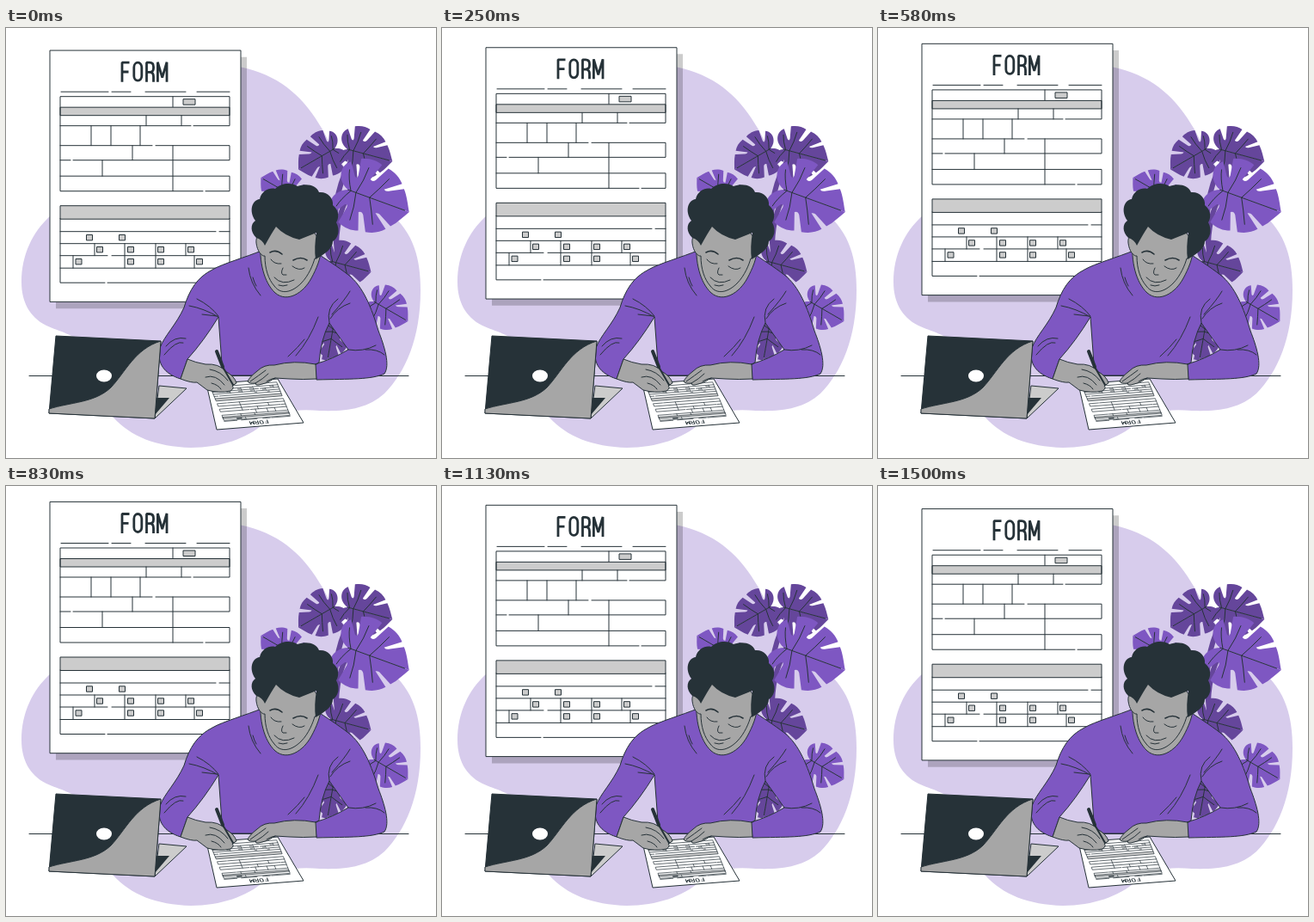
Animation, 500 px wide and 500 px high, one loop 1.54 s. Source, as an HTML page:

```html
<!DOCTYPE html>
<html lang="en">
<head>
<meta charset="utf-8">
<title>Filling in a form</title>
<style>
  html, body { margin: 0; width: 100%; height: 100%; overflow: hidden; background: #fff; }
  svg { display: block; width: 100vw; height: 100vh; }
  .line { fill: none; stroke: #263238; stroke-linecap: round; stroke-linejoin: round; }
  .ink { stroke: #263238; stroke-linejoin: round; }
  .thin { vector-effect: non-scaling-stroke; }
  .dark { fill: #65469b; }
  .purple { fill: #7e57c2; }
  .skin { fill: #a6a6a6; }
  .grey { fill: #ccc; }
</style>
</head>
<body>
<svg viewBox="0 0 500 500">
  <defs>
    <g id="half">
      <path d="M0 8C8 30 34 36 46 19L25 5Q21 0 28 0L56 5C62-8 62-20 58-31L29-21Q25-26 31-30L56-43C54-56 48-66 40-73L21-48Q18-53 22-58L33-79C23-88 10-94 0-100Z"/>
      <path class="line thin" d="M0 3Q18 14 32 17M0-6Q24-12 46-12M0-30Q18-40 40-50"/>
    </g>
    <g id="leaf">
      <use href="#half"/>
      <use href="#half" transform="scale(-1 1)"/>
      <path class="line thin" d="M0 8V-92"/>
    </g>
    <marker id="box" markerUnits="userSpaceOnUse" markerWidth="9" markerHeight="9" refX="4.5" refY="4.5">
      <path class="ink grey" stroke-width="1" d="M1 1.3H8V7.7H1Z"/>
    </marker>
    <!-- shared by the poster and the sheet on the table -->
    <g id="content">
      <path role="img" aria-label="FORM" fill="none" stroke="#263238" stroke-width="2.8" stroke-linejoin="bevel"
        d="M135 63V40.5H143.5M135 51.3H142.5M148.8 46a4.5 5.5 0 0 1 9 0V56a4.5 5.5 0 0 1-9 0ZM163.5 63V40.5H167Q171.5 40.5 171.5 45.5V47Q171.5 51.7 167 51.7H163.5M167.5 51.7Q171.5 52 171.5 57V63M176.4 63V40L181.7 58 187 40V63"/>
      <path class="ink grey thin" d="M63 92.5H260V102H63ZM63 207H260V222.5H63ZM206 83H220V89.5H206Z"/>
      <path class="line thin" d="M64 74.5H119M123 74.5H145M162 74.5H209M222 74.5H260
        M229 190H63V80H260V114H218M215 114H63M194 80V92M163 102V114M204 102V114
        M99 114V137M122 114V137M156 114V137M63 137H170M174 137H260V154H78M75 154H63M147 137V154
        M194 137V190M112 154V172.5M63 172.5H260V190H232
        M115 296.5H63V222M118 296.5H260M260 222V279.5H63M63 237H244M248 237H260
        M63 251H260M63 265H118M123 265H260M103 251V265M209 251V265M138 251V279.5M174 251V279.5M78 265V279.5M219 265V279.5"/>
      <path fill="none" marker-start="url(#box)" marker-mid="url(#box)" marker-end="url(#box)"
        d="M97 244H135M109 258h36h35h35M84.5 272H145H180H225"/>
    </g>
  </defs>

  <path fill="#d7ccec" d="M280 47C322 58 347 82 368 118C390 160 410 190 445 214C475 238 482 270 482 305C482 360 465 400 440 425C420 443 395 446 365 445C335 442 315 447 300 460C280 477 250 488 215 488C175 487 145 475 125 453C112 438 105 400 95 372C80 356 62 353 47 346C27 336 18 318 18 295C18 264 31 237 51 219L100 150 200 60C240 45 260 42 280 47Z"/>

  <g id="form">
    <path opacity=".2" d="M58 34H280V326.5H58Z"/>
    <path class="ink" fill="#fff" d="M51 26.4H273V318.7H51Z"/>
    <use href="#content"/>
  </g>

  <path class="line" d="M27 404.5H468"/>

  <!-- plant -->
  <path fill="none" stroke="#65469b" stroke-width="6" d="M398 160Q378 200 384 250T370 386M402 190Q386 210 384 250"/>
  <use href="#leaf" class="dark" transform="translate(379 142) rotate(-120) scale(.45)"/>
  <use href="#leaf" class="dark" transform="translate(401 142) rotate(105) scale(.5)"/>
  <use href="#leaf" class="purple" transform="translate(331 194) rotate(-60) scale(.4)"/>
  <use href="#leaf" class="dark" transform="translate(381 272) rotate(105) scale(.45)"/>
  <use href="#leaf" class="dark" transform="translate(380 351) rotate(190) scale(.35)"/>
  <use href="#leaf" class="purple" transform="translate(431 320) rotate(120) scale(.42)"/>
  <use href="#leaf" class="purple" transform="translate(403 190) rotate(110) scale(.7)"/>

  <!-- man -->
  <path class="ink purple" d="M297 259C280 266 252 274 240 281C222 290 213 305 207 325C198 345 184 358 179 372C175 390 184 402 203 408L211 385Q230 364 247 336L252 404H340L364 389Q366 362 376 343L398 374Q380 385 359 391L361 409C400 408 425 409 440 402C447 392 440 370 433 352C425 325 415 300 398 287C385 277 372 269 362 262Z"/>
  <path class="line" d="M282 279Q284 297 296 311M287 290Q289 297 291 300M213 323Q230 326 247 336M222 315Q238 323 247 335M228 333L245 335M186 370Q196 358 209 361M184 380Q198 363 206 366M328 382Q340 371 347 362M337 381Q353 363 363 336M376 343Q372 325 386 315M377 338Q385 325 400 320M379 333Q395 315 400 306M418 374Q432 373 440 380M398 374Q415 377 430 369"/>
  <path class="ink skin" d="M296 245C294 272 300 296 313 308C327 320 346 308 355 291C361 280 366 268 367 255L330 228Z"/>
  <path class="ink skin" d="M312 228C298 240 290 238 291 250C292 260 298 266 301 265C301 280 305 292 312 300C320 311 333 307 343 297C352 288 357 275 359 268C370 264 374 252 364 246L350 226Z"/>
  <path fill="#263238" d="M291 244C284 237 284 228 290 224C282 213 286 200 295 199C297 189 307 185 313 187C321 179 333 180 339 184C350 180 361 183 364 191C374 190 381 198 380 206C388 212 387 222 384 226C389 235 386 245 380 248C380 257 370 263 360 269Q358 255 361 238L341 246Q324 242 314 231Q308 240 301 253Q298 246 291 244Z"/>
  <path class="line" stroke-width="1.6" d="M307 261Q314 257 321 263M334 270Q343 265 350 270"/>
  <path class="line" d="M308 269Q312 275 320 274M333 277Q341 283 347 279M322 279Q319 285 322 287L326 287M312 290Q321 300 335 293M317 299Q322 301 327 299"/>

  <!-- laptop -->
  <path class="ink grey" d="M173 454L210 419 178 416Z"/>
  <path fill="#263238" d="M173 450L190 430H174Z"/>
  <path class="ink" fill="#263238" d="M58 358L180 364 173 454 50 448Z"/>
  <path class="ink skin" d="M180 364C150 373 139 400 122 418C103 436 75 435 50 443V448L173 454Z"/>
  <ellipse cx="114" cy="404.5" rx="9" ry="7" fill="#fff"/>

  <!-- sheet, hands and pen -->
  <path class="ink" fill="#fff" d="M233 414L245 467 346 459 316 408Z"/>
  <use href="#content" stroke-width=".7" transform="matrix(-.39 .031 -.072 -.178 360.6 462.6)"/>
  <path class="ink skin" d="M211 385L203 408Q216 413 222 412L234 421Q248 425 261 422Q266 419 263 416L268 413Q266 405 255 399Q248 390 232 391Q220 389 211 385Z"/>
  <path class="line" d="M232 406Q244 402 254 415M237 397Q250 399 258 410M239 413Q247 415 250 420"/>
  <path class="line" stroke-width="4" d="M245 376L252 394"/>
  <path class="line" stroke-width="2" d="M252 394L264 415"/>
  <path class="ink skin" d="M360 391L361 408Q345 409 330 408L313 407Q303 414 294 415Q290 416 290 413Q283 414 281 411Q283 406 292 399Q300 391 312 392Q335 386 360 391Z"/>
  <path class="line" d="M290 413Q299 408 305 402M284 411Q294 404 302 398M313 407Q307 408 303 411"/>
</svg>
<script>
const LOOP = 1540, STEP = 1000 / 24, LAST_STEP = 36;
const TOP_TIME = 705, TOP_SHIFT = -9.7, SPEED = .0133;
const form = document.getElementById('form');
const start = performance.now();

// the poster floats up and down at constant speed, in 24 steps per second
function tick() {
  const elapsed = (performance.now() - start) % LOOP;
  const time = Math.min(LAST_STEP, Math.floor((elapsed + 4.9) / STEP)) * STEP;
  const gap = Math.abs(time - TOP_TIME);
  const away = Math.min(gap, LOOP - gap);
  form.setAttribute('transform', `translate(0 ${TOP_SHIFT + away * SPEED})`);
  requestAnimationFrame(tick);
}
tick();
</script>
</body>
</html>
```
